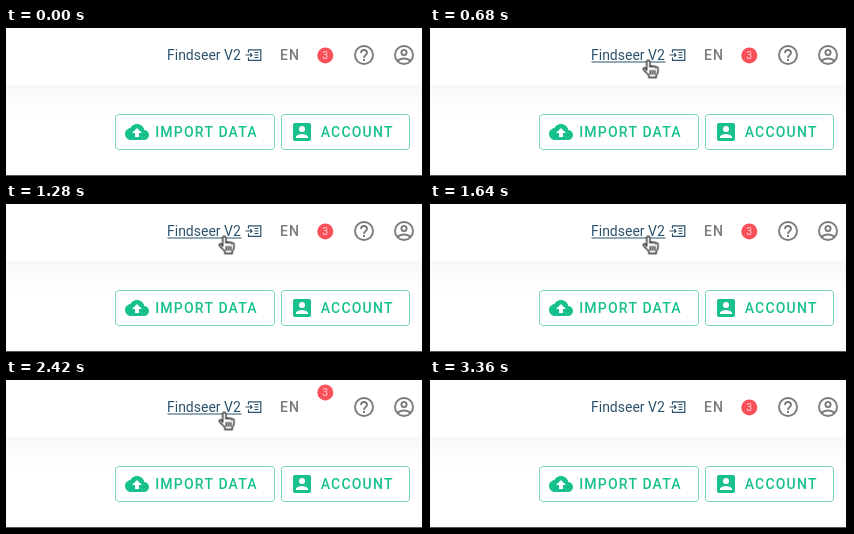
Recreate the animation shown at these times as an HTML page. Size 418 by 148 pixels, loop 3.46 s.

```html
<!DOCTYPE html>
<html lang="en">
<head>
<meta charset="utf-8">
<title>Toolbar hover</title>
<style>
  html, body { margin: 0; width: 100%; height: 100%; overflow: hidden; background: #fff; }
  svg { display: block; width: 418px; height: 148px; font: 14px Roboto, sans-serif; }
  .link { fill: #2b526c; }
  .line { fill: none; stroke: #2b526c; stroke-width: 1.2; }
  .grey { fill: none; stroke: #7b7b7b; stroke-width: 1.9; }
  .caps { font-weight: 500; letter-spacing: 1.2px; }
  .green { fill: #17c08d; }
  .frame { fill: #fff; stroke: #78d8bb; }

  .cursor, .arrow, .hand, .underline { animation: 3460ms linear infinite; }
  .cursor { animation-name: travel; }
  .arrow { animation-name: arrow; animation-timing-function: step-end; }
  .hand { animation-name: hand; animation-timing-function: step-end; }
  .underline { animation-name: underline; animation-timing-function: step-end; }
  .badge { animation: bounce 3460ms linear infinite; }

  @keyframes travel {
    0%, 2.9% { transform: translate(238px, 152px); }
    8.7% { transform: translate(230px, 92px); }
    13.87% { transform: translate(223px, 52px); }
    17.3% { transform: translate(222px, 47px); }
    19.65%, 82.95% { transform: translate(218px, 33px); }
    85.55% { transform: translate(221px, 65px); }
    88.4% { transform: translate(225px, 90px); }
    91.6%, 100% { transform: translate(232px, 152px); }
  }
  @keyframes arrow {
    0% { opacity: 1; }
    19.65% { opacity: 0; }
    83.8%, 100% { opacity: 1; }
  }
  @keyframes hand {
    0% { opacity: 0; }
    19.65% { opacity: 1; }
    83.8%, 100% { opacity: 0; }
  }
  @keyframes underline {
    0% { opacity: 0; }
    19.65% { opacity: 1; }
    89%, 100% { opacity: 0; }
  }
  /* a one second bounce starting at 1720 ms */
  @keyframes bounce {
    0% { transform: none; }
    55.49%, 65.03%, 72.83%, 78.61% {
      transform: translateY(0);
      animation-timing-function: cubic-bezier(.215, .61, .355, 1);
    }
    61.27%, 62.14% {
      transform: translateY(-30px);
      animation-timing-function: cubic-bezier(.755, .05, .855, .06);
    }
    69.94% {
      transform: translateY(-15px);
      animation-timing-function: cubic-bezier(.755, .05, .855, .06);
    }
    75.72% { transform: translateY(-4px); }
    100% { transform: none; }
  }
</style>
</head>
<body>
<svg viewBox="0 0 418 148">
  <defs>
    <linearGradient id="shade" x2="0" y2="1">
      <stop stop-color="#f8f8f8"/>
      <stop offset="1" stop-color="#fff"/>
    </linearGradient>
  </defs>
  <rect width="418" height="148" fill="#fff"/>
  <rect y="57" width="416" height="34" fill="url(#shade)"/>

  <text class="link" x="161" y="31.5">Findseer V2</text>
  <path class="line underline" d="M161.5 34H235.5" stroke-width="1"/>
  <path class="line" d="M242.5 24.5V21.8H254.8V32.4H242.5V29.5M239.5 27H246M244.2 25.2L246 27L244.2 28.8M248.5 24.5H252.5M248.5 27H252.5M248.5 29.5H252.5"/>

  <text class="caps" x="274" y="32" fill="#7b7b7b">EN</text>

  <g class="badge">
    <circle cx="319.3" cy="27.4" r="8" fill="#fa5159"/>
    <text x="319.3" y="31" text-anchor="middle" font-size="10.5" fill="#ffd0d0">3</text>
  </g>

  <g class="grey" transform="translate(346 15)">
    <circle cx="12" cy="12" r="9"/>
    <path d="M9 10a3 3 0 1 1 6 0c0 2-3 2.2-3 5M12 16v2"/>
  </g>
  <g class="grey" transform="translate(386 15)">
    <circle cx="12" cy="12" r="9"/>
    <circle cx="12" cy="9.5" r="2.6"/>
    <path d="M5.8 18c1.6-2 4-2.5 6.2-2.5s4.6.5 6.2 2.5"/>
  </g>

  <rect class="frame" x="109.5" y="86.5" width="159" height="35" rx="3"/>
  <path class="green" transform="translate(119 92)" d="M19.35 10.04C18.67 6.59 15.64 4 12 4 9.11 4 6.6 5.64 5.35 8.04 2.34 8.36 0 10.91 0 14c0 3.31 2.69 6 6 6h13c2.76 0 5-2.24 5-5 0-2.64-2.05-4.78-4.65-4.96zM14 13v4h-4v-4H7l5-5 5 5h-3z"/>
  <text class="caps green" x="149.2" y="109">IMPORT DATA</text>

  <rect class="frame" x="275.5" y="86.5" width="128" height="35" rx="3"/>
  <g transform="translate(284 92)" fill="#fff">
    <rect class="green" x="3" y="3" width="18" height="18" rx="2"/>
    <circle cx="12" cy="9" r="3"/>
    <path d="M6 17c0-2 4-3.1 6-3.1s6 1.1 6 3.1v1H6z"/>
  </g>
  <text class="caps green" x="314.7" y="109">ACCOUNT</text>

  <path d="M0 147.5H418" stroke="#555"/>
  <path d="M417 0V148" stroke="#000" stroke-width="2"/>

  <g class="cursor" stroke-linejoin="round">
    <path class="arrow" d="M0 0V16l3.7-3.5 2.4 5.6 2.6-1.1-2.4-5.5H11z" fill="#111" stroke="#fff"/>
    <g class="hand" transform="translate(-5.5 -1.5) scale(1.06)" stroke="#333" stroke-width="1.3">
      <path d="M4 10V2.2a1.5 1.5 0 0 1 3 0V7a1.4 1.4 0 0 1 2.6 0 1.4 1.4 0 0 1 2.6.6 1.3 1.3 0 0 1 2.4.8V12l-1.6 3v2H6v-2L1 9.6c-.8-1.4.8-2.4 1.9-1.2z" fill="#fff"/>
      <path d="M7.2 10v4.5M9.4 10v4.5M11.6 10v4.5"/>
    </g>
  </g>
</svg>
</body>
</html>
```
